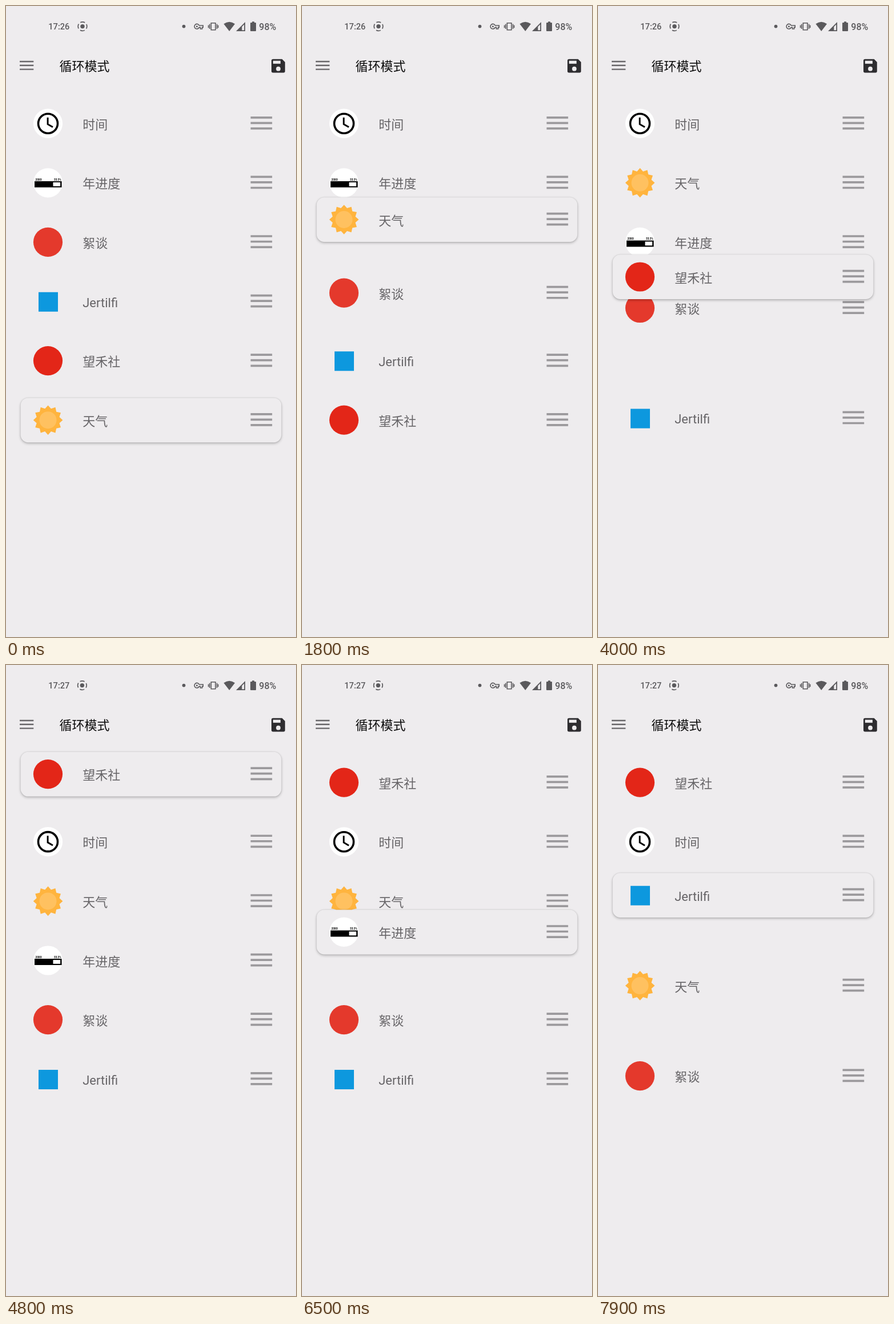
These frames come from a looping animation (508x1102 px, 8000 ms). An HTML page:

```html
<!DOCTYPE html>
<html lang="zh-CN">
<head>
<meta charset="utf-8">
<title>循环模式</title>
<style>
  html, body { margin: 0; width: 100%; height: 100%; overflow: hidden; background: #eeecee; }
  svg { display: block; width: 100%; height: 100%; }
  text { font-family: Roboto, "Noto Sans CJK SC", "Noto Sans CJK", sans-serif; }
  .label { font-size: 22px; fill: #666467; }
  .title { font-size: 22px; fill: #0c0c0c; }
  .status { font-weight: 500; fill: #5a595c; }
  .tiny { font-size: 4.6px; font-weight: 700; }
  .card { fill: #eeecee; filter: drop-shadow(0 0 1.1px rgba(0,0,0,.15)) drop-shadow(0 2.2px 2.3px rgba(0,0,0,.23)); }
</style>
</head>
<body>
<svg id="stage" viewBox="0 0 508 1102">
  <rect width="508" height="1102" fill="#eeecee"/>

  <g fill="#5a595c" stroke="none">
    <text id="time" class="status" x="74.3" y="41.3" font-size="14.6"></text>
    <g id="record">
      <circle cx="134" cy="35.6" r="3.7"/>
      <circle cx="134" cy="35.6" r="7.8" fill="none" stroke="#5a595c" stroke-width="1.7"
        stroke-dasharray="8.25 4" stroke-dashoffset="4.1"/>
    </g>
    <circle cx="311.5" cy="35.6" r="2.9"/>
    <g fill="none" stroke="#5a595c" stroke-width="1.6">
      <path d="M338.3 34H345.2V37.4H343.6V40H340.5V37.4H338.3A4.3 4.3 0 1 1 338.3 34Z"/>
      <path d="M359.3 29.8h7.6v12h-7.6zM356.7 31.5v8.6M354.6 33.4v4.8M369.5 31.5v8.6M371.6 33.4v4.8"/>
    </g>
    <circle cx="334.4" cy="35.7" r="1.5"/>
    <path d="M391.2 44L381.4 31.2Q391.2 24.2 401 31.2Z"/>
    <path fill-rule="evenodd" d="M403 44L419 28V44ZM413.3 36.2L417.2 32.3V42.3H413.3Z"/>
    <path d="M431 27.2h4v1.8h2q1 0 1 1v13q0 1-1 1h-8q-1 0-1-1v-13q0-1 1-1h2z"/>
    <text class="status" x="443.3" y="41.5" font-size="16">98%</text>
  </g>

  <path d="M24 97h24.3M24 103.8h24.3M24 110.6h24.3" stroke="#69676a" stroke-width="2.4"/>
  <text class="title" x="93.6" y="113.4">循环模式</text>
  <path d="M467.7 92.8H483.6L488.8 98V113.8Q488.8 116.5 486.1 116.5H467.7Q465 116.5 465 113.8V95.5Q465 92.8 467.7 92.8Z" fill="#2e2d30"/>
  <path d="M467.8 95.6h13.1v5.2h-13.1z" fill="#eeecee"/>
  <circle cx="477" cy="109.7" r="3.9" fill="#eeecee"/>

  <g id="list"></g>
</svg>
<script>
const LOOP = 8000, STEP = 100, MOVE = 250, CLOCK_TICK = 4200;
const rowY = slot => 205.2 + 103.6 * slot;
const ease = p => 0.5 - 0.5 * Math.cos(Math.PI * Math.min(1, Math.max(0, p)));

const disc = (fill, r = 25.6) => `<circle cx="73.5" r="${r}" fill="${fill}"/>`;
const star = Array.from({ length: 24 }, (_, i) => {
  const r = i % 2 ? 20.6 : 25.8, a = i * Math.PI / 12;
  return `${73.6 + r * Math.sin(a)},${-r * Math.cos(a)}`;
}).join(' ');

const items = {
  clock: { label: '时间', icon: disc('#fff') +
    '<circle cx="73.5" r="17" fill="none" stroke="#000" stroke-width="3.6"/>' +
    '<path d="M73.1 -10.5V1.2L82 6.4" fill="none" stroke="#000" stroke-width="2.9"/>' },
  year: { label: '年进度', icon: disc('#fff') +
    '<path d="M50 -2.9h47.6v10.9h-47.6z"/><path d="M82.5 -0.9h12.6v6.8h-12.6z" fill="#fff"/>' +
    '<text class="tiny" x="51.6" y="-4.2">20XX</text><text class="tiny" x="84" y="-4.2">33.3%</text>' },
  chat: { label: '絮谈', icon: disc('#e4392c') },
  video: { label: 'Jertilfi', icon: '<path d="M57 -16.3h34v34h-34z" fill="#0d98de"/>' },
  reading: { label: '望禾社', icon: disc('#e32618') },
  sun: { label: '天气', icon: `<polygon points="${star}" fill="#ffb43e"/>` + disc('#ffc160', 15) }
};

// Each path lists [time, y] points of the finger.
const drags = [
  { id: 'sun', press: -100, release: 2600, path: [[150, 723.2], [900, 545], [1611, 412.4],
    [1800, 373], [2150, 305], [2400, 283], [2560, 283]] },
  { id: 'reading', press: 2950, release: 5300, path: [[3480, 723.2], [3778, 619.6], [3945, 516],
    [4000, 473], [4250, 300], [4500, 215], [4750, 192], [5250, 190]] },
  { id: 'year', press: 6150, release: 7100, path: [[6250, 516], [6700, 408], [6850, 386], [7100, 384.5]] },
  { id: 'video', press: 7400, release: LOOP, path: [[7500, 723.2], [7686, 619.6], [7786, 516],
    [7900, 402], [8000, 330]] }
];

// Smooth cubic through the points, at rest at both ends.
function follow(path, t) {
  const last = path.length - 1;
  if (t <= path[0][0]) return path[0][1];
  if (t >= path[last][0]) return path[last][1];
  const i = path.findIndex(p => p[0] > t) - 1;
  const slope = k => k === 0 || k === last ? 0 :
    (path[k + 1][1] - path[k - 1][1]) / (path[k + 1][0] - path[k - 1][0]);
  const [t0, y0] = path[i], [t1, y1] = path[i + 1], span = t1 - t0, u = (t - t0) / span;
  const blend = u * u * (3 - 2 * u);
  return y0 + (y1 - y0) * blend +
    span * u * (1 - u) * (slope(i) * (1 - u) - slope(i + 1) * u);
}

// A row slides down one slot once the dragged card passes its centre.
const order = Object.keys(items);
order.forEach((id, slot) => Object.assign(items[id], { slot, moves: [] }));
for (const drag of drags) {
  drag.slot = order.indexOf(drag.id);
  for (let t = drag.path[0][0]; t < drag.release; t++) {
    if (drag.slot > 0 && follow(drag.path, t) < rowY(drag.slot - 1)) {
      const other = order[drag.slot - 1];
      order[drag.slot] = other;
      order[--drag.slot] = drag.id;
      items[other].moves.push([t, 1]);
      items[drag.id].moves.push([t, -1]);
    }
  }
}

const list = document.getElementById('list');
for (const item of Object.values(items)) {
  const g = document.createElementNS('http://www.w3.org/2000/svg', 'g');
  g.innerHTML = '<rect class="card" x="25.6" y="-38.8" width="456.8" height="77.8" rx="13.5"/>' + item.icon +
    `<text class="label" x="134.2" y="9.6">${item.label}</text>` +
    '<path d="M428.5 -10.4h37.7M428.5 -0.9h37.7M428.5 8.7h37.7" stroke="#9b999c" stroke-width="3.7"/>';
  item.node = list.appendChild(g);
  item.card = g.firstChild;
}

const time = document.getElementById('time'), record = document.getElementById('record');

function draw(t) {
  const late = t >= CLOCK_TICK;
  time.textContent = late ? '17:27' : '17:26';
  record.setAttribute('transform', `translate(${late ? -0.6 : 0} 0)`);
  const drag = drags.find(d => t >= d.press && t < d.release + MOVE);
  for (const [id, item] of Object.entries(items)) {
    const held = drag && drag.id === id;
    let y = rowY(item.moves.reduce((s, [start, d]) => s + d * ease((t - start) / MOVE), item.slot));
    if (held) {
      const finger = follow(drag.path, t);
      y = finger + (rowY(drag.slot) - finger) * ease((t - drag.release) / MOVE);
    }
    item.node.setAttribute('transform', `translate(0 ${y.toFixed(2)})`);
    item.card.style.display = held ? '' : 'none';
    if (held && list.lastChild !== item.node) list.appendChild(item.node);
  }
}

const begin = performance.now();
function tick() {
  const t = Math.max(0, performance.now() - begin) % LOOP;
  draw(Math.floor(t / STEP) * STEP);
  requestAnimationFrame(tick);
}
tick();
</script>
</body>
</html>
```
